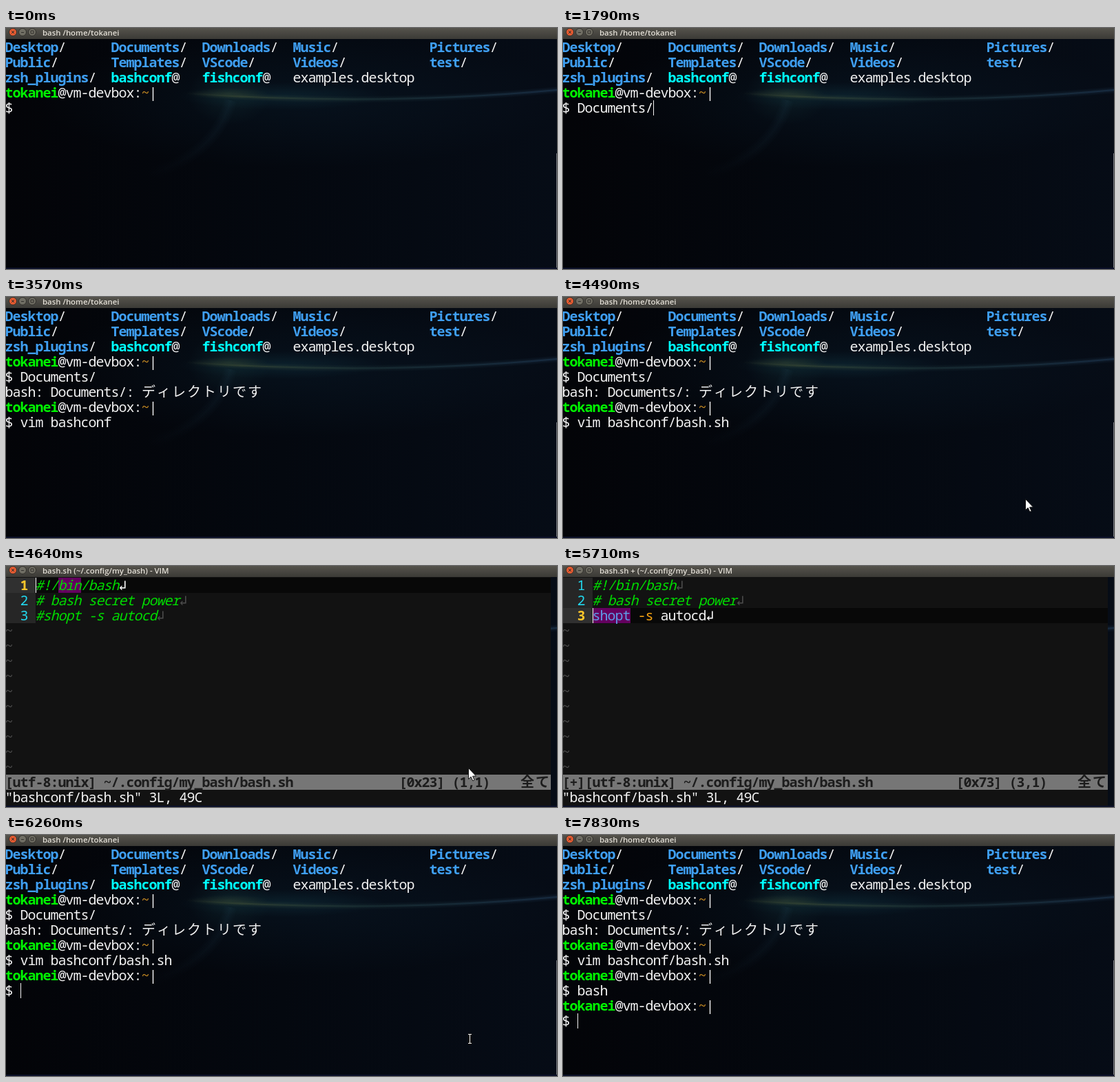
An HTML page with a canvas for the animation above (8000 ms loop, 800 px wide and 350 px high).

```html
<!DOCTYPE html>
<html lang="ja">
<head>
<meta charset="utf-8">
<title>Terminal session</title>
<style>
html, body { margin: 0; width: 100%; height: 100%; overflow: hidden; background: #03050a; }
canvas { display: block; }
</style>
</head>
<body>
<canvas id="stage" width="800" height="350"></canvas>
<script>
const ctx = document.getElementById('stage').getContext('2d');
const LOOP = 8000, CELL = 11, ROW = 22, LEFT = -1, TOP = 17;
const MONO = '"Noto Sans Mono", "DejaVu Sans Mono", "Noto Sans CJK JP", monospace';
const WIDE = '"Noto Sans CJK JP", "Noto Sans CJK", sans-serif';
const USER = 'tokanei', HOST = 'vm-devbox';

const STYLE = {
  text: ['#f2f2f2'],
  dir: ['#3f9ff2', 'bold'],
  link: ['#00ffff', 'bold'],
  user: ['#00f600', 'bold'],
  path: ['#c88c22'],
  comment: ['#00d900', 'italic 500'],
  builtin: ['#5f9be8'],
  option: ['#f5a312'],
  eol: ['#ffffff'],
  dim: ['#4c4c4c'],
  num: ['#22d8ee'],
  curNum: ['#ffc62b', 'bold'],
  status: ['#1c1c1c', 'bold']
};

// Last value whose time has come.
const at = (t, keys) => keys.reduce((v, [time, next]) => t >= time ? next : v, keys[0][1]);
const within = (t, spans) => spans.some(([a, b]) => t >= a && t < b);
const colX = c => LEFT + c * CELL;
const rowY = r => TOP + r * ROW;

function fill(color, x, y, w, h) {
  ctx.fillStyle = color;
  ctx.fillRect(x, y, w, h);
}

// Puts text on the character grid; returns the next free column.
function put(row, col, text, style = 'text') {
  const [color, face = '500'] = STYLE[style];
  ctx.fillStyle = color;
  ctx.textAlign = 'center';
  ctx.textBaseline = 'alphabetic';
  for (const ch of text) {
    const wide = ch > '\u3000';
    const span = wide ? 2 : 1;
    ctx.font = wide ? `${face} 20px ${WIDE}` : `${face} 20px ${MONO}`;
    const x = colX(col + span / 2) - (wide ? 1 : 0);
    if (ch !== ' ') ctx.fillText(ch, x, rowY(row) + 18);
    col += span;
  }
  return col;
}

function caret(row, col) {
  fill('#f4f4f4', colX(col), rowY(row), 1, ROW);
}

function titleBar(title) {
  const g = ctx.createLinearGradient(0, 0, 0, 16);
  g.addColorStop(0, '#55534c');
  g.addColorStop(1, '#3b3a36');
  fill(g, 0, 0, 800, 16);
  ['#e65b31', '#706e64', '#706e64'].forEach((color, i) => {
    const x = 10 + i * 14;
    ctx.beginPath();
    ctx.arc(x, 6, 5.5, 0, 7);
    ctx.fillStyle = color;
    ctx.fill();
    ctx.strokeStyle = '#302f2b';
    ctx.lineWidth = 1;
    ctx.stroke();
    ctx.beginPath();
    if (i === 0) {
      ctx.moveTo(x - 2, 4); ctx.lineTo(x + 2, 8);
      ctx.moveTo(x + 2, 4); ctx.lineTo(x - 2, 8);
    } else if (i === 1) {
      ctx.moveTo(x - 2, 6.5); ctx.lineTo(x + 2, 6.5);
    } else {
      ctx.rect(x - 2, 4, 4, 4);
    }
    ctx.stroke();
  });
  ctx.font = '600 11.4px "Open Sans", "Noto Sans", sans-serif';
  ctx.textAlign = 'left';
  ctx.textBaseline = 'alphabetic';
  ctx.fillStyle = '#e3dfd6';
  ctx.fillText(title, 53, 11);
}

function glow(x, y, rx, ry, color) {
  ctx.save();
  ctx.translate(x, y);
  ctx.scale(rx, ry);
  const g = ctx.createRadialGradient(0, 0, 0, 0, 0, 1);
  g.addColorStop(0, `rgba(${color})`);
  g.addColorStop(1, `rgba(${color.replace(/[^,]+$/, '0')})`);
  fill(g, -1, -1, 2, 2);
  ctx.restore();
}

function wallpaper() {
  const base = ctx.createLinearGradient(0, 0, 800, 0);
  base.addColorStop(0, '#030408');
  base.addColorStop(0.5, '#04080f');
  base.addColorStop(1, '#060c16');
  fill(base, 0, 0, 800, 350);
  glow(430, 104, 380, 100, '14,42,64,0.26');
  glow(400, 99, 150, 20, '20,62,74,0.35');
  glow(325, 96, 60, 45, '24,62,66,0.3');
  glow(325, 95, 55, 8, '60,74,50,0.35');

  const arc = ctx.createLinearGradient(260, 0, 800, 0);
  arc.addColorStop(0, 'rgba(60,72,50,0)');
  arc.addColorStop(0.15, 'rgba(66,80,54,0.7)');
  arc.addColorStop(0.5, 'rgba(36,64,66,0.65)');
  arc.addColorStop(1, 'rgba(36,66,96,0.7)');
  ctx.strokeStyle = arc;
  [[9, 0.15], [5, 0.25], [2, 0.6]].forEach(([width, alpha]) => {
    ctx.globalAlpha = alpha;
    ctx.lineWidth = width;
    ctx.beginPath();
    ctx.moveTo(262, 95);
    ctx.quadraticCurveTo(540, 114, 800, 90);
    ctx.stroke();
  });

  const tail = ctx.createLinearGradient(326, 105, 200, 215);
  tail.addColorStop(0, '#285068');
  tail.addColorStop(1, 'rgba(40,80,104,0)');
  ctx.strokeStyle = tail;
  ctx.globalAlpha = 0.035;
  for (let width = 3; width <= 18; width += 5) {
    ctx.lineWidth = width;
    ctx.beginPath();
    ctx.moveTo(326, 105);
    ctx.quadraticCurveTo(305, 185, 200, 215);
    ctx.stroke();
  }
  ctx.globalAlpha = 1;
  fill('#0b1028', 0, 348, 800, 2);
}

function prompt(row) {
  let c = put(row, 0, USER, 'user');
  c = put(row, c, `@${HOST}:`);
  c = put(row, c, '~', 'path');
  put(row, c, '|');
}

const COLS = [0, 14, 26, 38, 56];
const LISTING = [
  ['Desktop/', 'Documents/', 'Downloads/', 'Music/', 'Pictures/'],
  ['Public/', 'Templates/', 'VScode/', 'Videos/', 'test/'],
  ['zsh_plugins/', 'bashconf@', 'fishconf@', 'examples.desktop']
];

function listing() {
  LISTING.forEach((names, r) => names.forEach((name, i) => {
    const mark = name.slice(-1);
    const style = { '/': 'dir', '@': 'link' }[mark];
    if (!style) return put(r, COLS[i], name);
    put(r, put(r, COLS[i], name.slice(0, -1), style), mark);
  }));
}

// Commands: row of the input line, time the prompt shows, keystrokes.
const COMMANDS = [
  { row: 4, from: 0, keys: [[0, ''], [1240, 'D'], [1320, 'Do'], [1400, 'Doc'],
    [1480, 'Docu'], [1640, 'Docum'], [1790, 'Documents/']] },
  { row: 7, from: 1960, keys: [[0, ''], [2730, 'v'], [2800, 'vi'], [2880, 'vim'],
    [2950, 'vim '], [3030, 'vim b'], [3170, 'vim bashconf'], [3650, 'vim bashconf/'],
    [3860, 'vim bashconf/b'], [4090, 'vim bashconf/bash.sh ']] },
  { row: 9, from: 6260, keys: [[0, ''], [7270, 'b'], [7350, 'ba'], [7430, 'bas'], [7510, 'bash']] },
  { row: 11, from: 7830, keys: [[0, '']] }
];
const CARET_OFF = [[0, 300], [930, 1160], [2490, 2730], [3570, 3650], [4490, 4640],
  [6190, 6260], [6720, 7270], [7760, 7830]];

function terminal(t) {
  wallpaper();
  fill('#777b80', 799, 182, 1, 166);
  listing();
  const shown = COMMANDS.filter(c => t >= c.from);
  shown.forEach((cmd, i) => {
    prompt(cmd.row - 1);
    const end = put(cmd.row, 0, '$ ' + at(t, cmd.keys));
    if (i === shown.length - 1 && !within(t, CARET_OFF)) caret(cmd.row, end);
  });
  if (t >= 1960) put(5, 0, 'bash: Documents/: ディレクトリです');
  titleBar('bash /home/' + USER);
}

function editor(t) {
  const line = at(t, [[4640, 1], [5190, 2], [5340, 3]]);
  const edited = t >= 5640;
  const saved = t >= 6110;
  wallpaper();
  fill('#121212', 0, 16, 791, 332);
  fill('#262626', 0, TOP, 43, ROW * 3);
  fill('#303030', 0, rowY(line - 1), 43, ROW);
  fill('#080808', 43, rowY(line - 1), 748, ROW);

  // Word under the cursor: column and length.
  const [col, len] = edited ? [4, 5] : [[7, 3], [6, 4], [5, 5]][line - 1];
  fill('#64005f', colX(col), rowY(line - 1), len * CELL, ROW);

  const lines = [
    [['#!/bin/bash', 'comment']],
    [['# bash secret power', 'comment']],
    edited ? [['shopt', 'builtin'], [' -s', 'option'], [' autocd', 'text']]
           : [['#shopt -s autocd', 'comment']]
  ];
  lines.forEach((parts, r) => {
    const current = r === line - 1;
    put(r, 2, String(r + 1), current ? 'curNum' : 'num');
    const end = parts.reduce((c, [text, style]) => put(r, c, text, style), 4);
    put(r, end, '↲', current ? 'eol' : 'dim');
  });
  for (let r = 3; r < 13; r++) put(r, 0, '~', 'dim');

  fill('#767676', 0, rowY(13), 791, ROW);
  const flag = edited && !saved ? '[+]' : '';
  put(13, 0, flag + '[utf-8:unix] ~/.config/my_bash/bash.sh', 'status');
  put(13, 52, `[0x${edited ? 73 : 23}] (${line},1)`, 'status');
  put(13, 68, '全て', 'status');

  const message = at(t, [[4640, '"bashconf/bash.sh" 3L, 49C'], [5790, ':'], [5960, ':w'],
    [6030, ':wq'], [6110, '"bashconf/bash.sh" 3L, 48C']]);
  const end = put(14, 0, message);
  if (message[0] === ':') caret(14, end);
  else caret(line - 1, 4);
  titleBar(`bash.sh ${flag ? '+ ' : ''}(~/.config/my_bash) - VIM`);
}

function strokeTwice(path) {
  [['#101010', 3], ['#f4f4f4', 1]].forEach(([color, width]) => {
    ctx.strokeStyle = color;
    ctx.lineWidth = width;
    ctx.stroke(path);
  });
}

function beam(x, y) {
  const p = new Path2D();
  p.moveTo(x - 2, y - 6.5); p.lineTo(x + 3, y - 6.5);
  p.moveTo(x + 0.5, y - 6); p.lineTo(x + 0.5, y + 6);
  p.moveTo(x - 2, y + 6.5); p.lineTo(x + 3, y + 6.5);
  strokeTwice(p);
}

function arrow(x, y) {
  const p = new Path2D();
  [[0, 0], [0, 16], [3.6, 12.6], [6.3, 18.5], [8.6, 17.4], [6, 11.8], [11, 11.6]]
    .forEach(([dx, dy]) => p.lineTo(x + dx, y + dy));
  p.closePath();
  ctx.fillStyle = '#ffffff';
  ctx.fill(p);
  ctx.strokeStyle = '#161616';
  ctx.lineWidth = 1;
  ctx.stroke(p);
}

function pointer(t) {
  if (within(t, [[70, 1160], [6190, 7270]])) {
    const left = at(t, [[70, 1], [150, 0.6], [220, 0.25], [300, 0], [6190, 0]]);
    beam(673 + Math.round(23 * left), 296 + Math.round(43 * left));
  } else if (within(t, [[4490, 5190]])) {
    arrow(671.5, 293.5);
  }
}

function frame(now) {
  const t = now % LOOP;
  if (t >= 4640 && t < 6190) editor(t);
  else terminal(t);
  pointer(t);
  requestAnimationFrame(frame);
}
requestAnimationFrame(frame);
</script>
</body>
</html>
```
